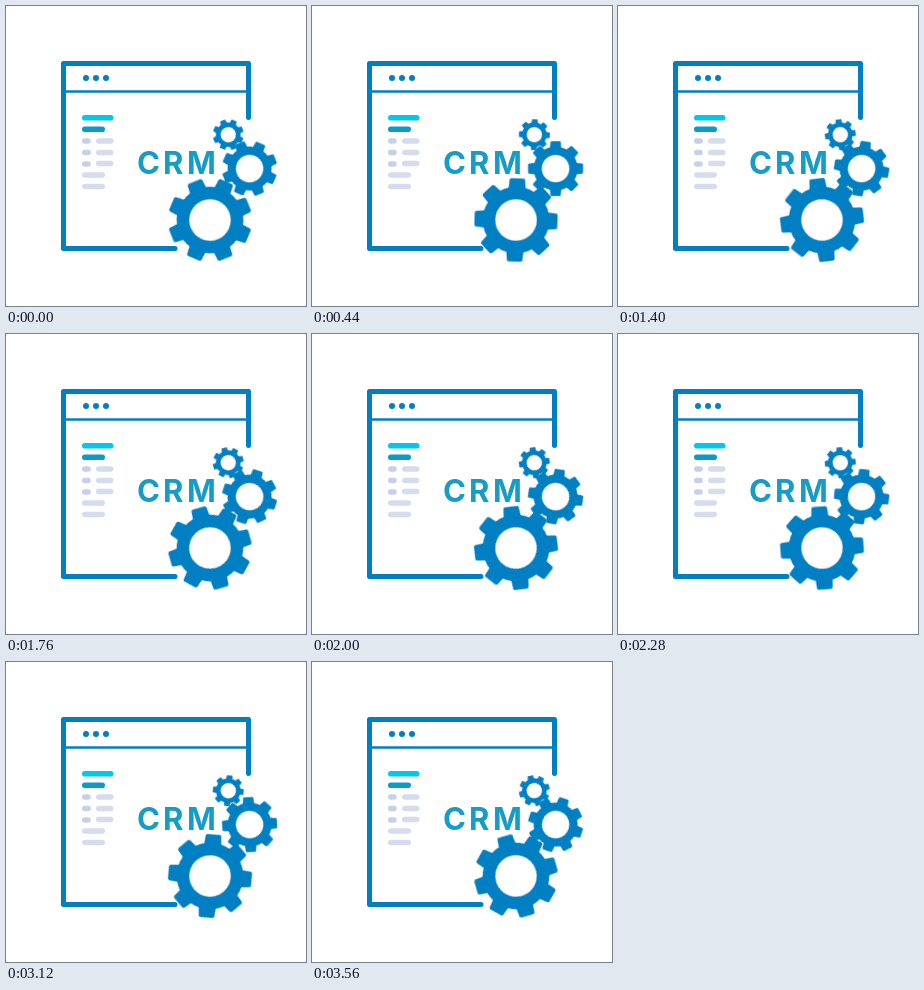
An HTML page for the animation above (3.6 s loop, 300 by 300 pixels).

```html
<!DOCTYPE html>
<html lang="en">
<head>
<meta charset="utf-8">
<title>CRM gears</title>
<style>
  html, body { margin: 0; width: 100%; height: 100%; overflow: hidden; background: #fff; }
  svg { display: block; width: 300px; height: 300px; }
  .line { fill: none; stroke: #0080c3; stroke-linecap: round; stroke-linejoin: round; }
  .bars { fill: none; stroke: #d5dcee; stroke-width: 5.6; stroke-linecap: round; }
  .bars .dark { stroke: #c6d0e8; }
  .bars .cyan { stroke: #00c6f2; }
  .bars .blue { stroke: #0a9bcb; }
  text { font: 700 31px Inter, "Open Sans", sans-serif; fill: #159dc8; }
  .spin { animation: spin 3.6s steps(90) infinite; }
  .back { animation-direction: normal; --turn: -540deg; }
  .fore { --turn: 540deg; }
  @keyframes spin { to { transform: rotate(var(--turn)); } }
</style>
</head>
<body>
<svg viewBox="0 0 300 300">
  <defs>
    <path id="tooth" d="M-7 -30L-6 -39.8H6L7 -30Z" fill="#0080c3" stroke="#0080c3" stroke-width="3.6" stroke-linejoin="round"/>
    <g id="pair"><use href="#tooth"/><use href="#tooth" transform="rotate(180)"/></g>
    <g id="gear">
      <circle r="27" fill="#fff" stroke="#0080c3" stroke-width="12.6"/>
      <use href="#pair"/>
      <use href="#pair" transform="rotate(45)"/>
      <use href="#pair" transform="rotate(90)"/>
      <use href="#pair" transform="rotate(135)"/>
    </g>
  </defs>

  <path class="line" stroke-width="5" d="M169 242.5H57.5V57.5H242.5V111.5"/>
  <path class="line" stroke-width="2.5" d="M58 85.5H242"/>
  <g fill="#0080c3">
    <circle cx="80" cy="72" r="3"/>
    <circle cx="90" cy="72" r="3"/>
    <circle cx="100" cy="72" r="3"/>
  </g>

  <g class="bars">
    <path class="cyan" d="M78.8 111.8H104.7"/>
    <path class="blue" d="M78.8 123.3H96.2"/>
    <path class="dark" d="M78.8 135H82M78.8 146.5H82M78.8 158H82"/>
    <path d="M92.8 135H104.7M92.8 146.5H104.7M92.8 157.5H104.7M78.8 169H96.2M78.8 180.5H96.2"/>
  </g>

  <text x="131 157 181" y="168">CRM</text>

  <g transform="translate(222.3 128.7) rotate(-22) scale(.37)"><g class="spin back"><use href="#gear"/></g></g>
  <g transform="translate(243.6 162.6) rotate(24) scale(.66)"><g class="spin fore"><use href="#gear"/></g></g>
  <g transform="translate(204 214) rotate(-22)"><g class="spin back"><use href="#gear"/></g></g>
</svg>
</body>
</html>
```
